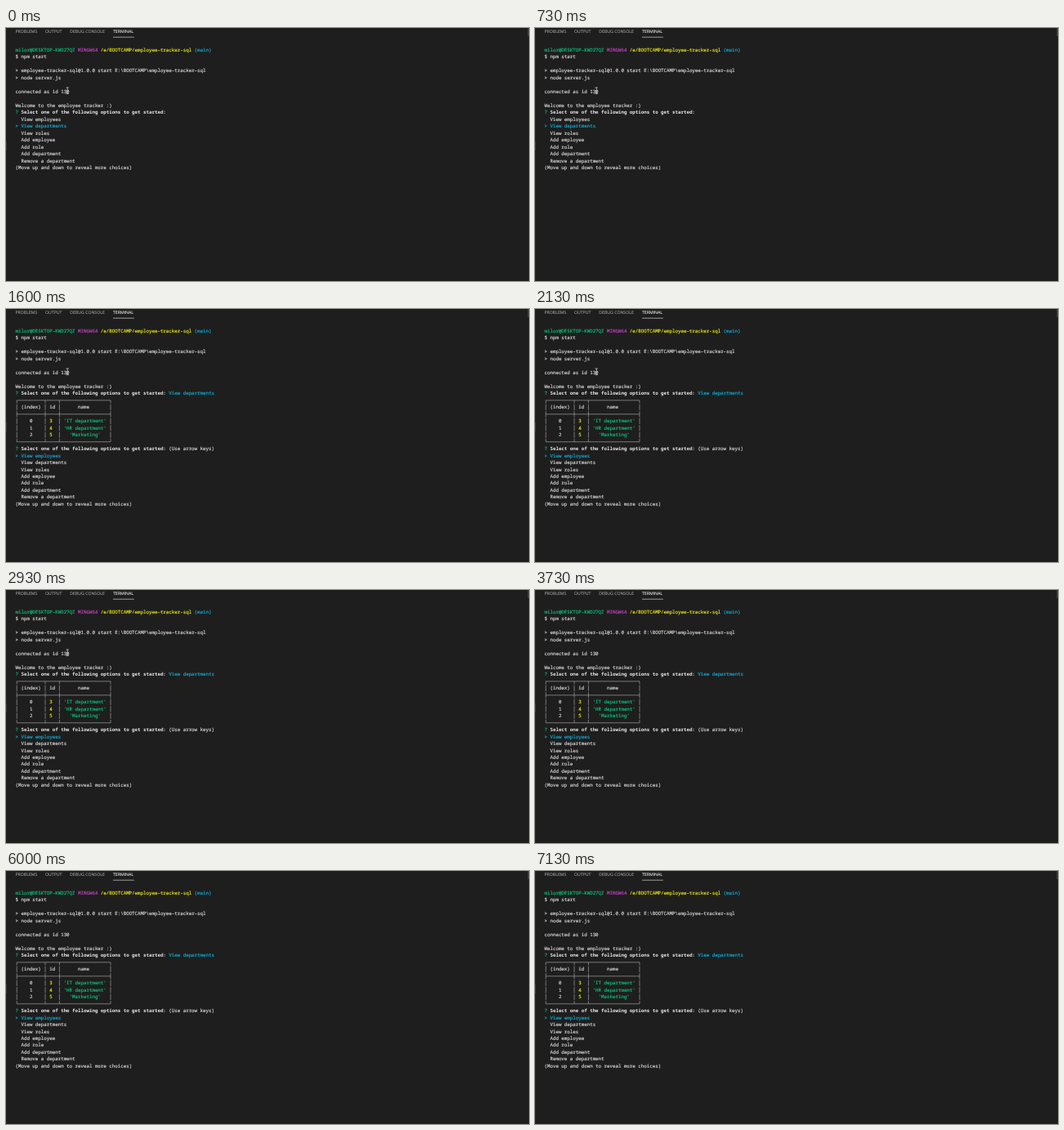
An HTML page that plays this animation: 640x310 px, repeating every 7200 ms.

```html
<!DOCTYPE html>
<html lang="en">
<head>
<meta charset="utf-8">
<title>Employee tracker terminal</title>
<style>
  html, body { margin: 0; width: 100%; height: 100%; overflow: hidden; background: #1e1e1e; }
  svg { display: block; width: 640px; height: 310px; }
  text { font-family: "Noto Sans Mono", "DejaVu Sans Mono", monospace; font-size: 5.8px;
         text-rendering: geometricPrecision; stroke-width: 0.18px; }
  .tab { font-family: "Open Sans", "Noto Sans", sans-serif; font-size: 5.2px; stroke-width: 0.1px; }
</style>
</head>
<body>
<svg id="stage" viewBox="0 0 640 310"></svg>
<script>
const NS = "http://www.w3.org/2000/svg";
const LOOP = 7200, ANSWER_AT = 1600, POINTER_HIDDEN_AT = 3200;
const LEFT = 11.5, BASELINE = 28.9, CELL = 3.478, ROW = 8.48;
const C = { text: "#d0d0d0", bold: "#e8e8e8", green: "#0dbc79", magenta: "#bc3fbc",
            yellow: "#e5e510", cyan: "#11a8cd", rule: "#b4b4b4" };
const CHOICES = ["View employees", "View departments", "View roles", "Add employee",
                 "Add role", "Add department", "Remove a department"];
const stage = document.getElementById("stage");

function add(parent, tag, attrs, content) {
  const node = document.createElementNS(NS, tag);
  for (const key in attrs) node.setAttribute(key, attrs[key]);
  if (content) node.textContent = content;
  return parent.appendChild(node);
}
const group = () => add(stage, "g", {});
const rect = (parent, x, y, width, height, fill) => add(parent, "rect", { x, y, width, height, fill });
const colX = col => LEFT + col * CELL;
const rowY = row => BASELINE + row * ROW;

function write(parent, row, col, content, color = C.text, weight = 400) {
  const stroke = weight > 400 ? "none" : color;
  add(parent, "text", { x: colX(col), y: rowY(row), fill: color, stroke, "font-weight": weight }, content);
}

function question(parent, row) {
  write(parent, row, 0, "?", C.green);
  write(parent, row, 2, "Select one of the following options to get started:", C.bold, 700);
}

function menu(parent, row, selected) {
  CHOICES.forEach((choice, i) => {
    const active = i === selected;
    if (active) write(parent, row + i, 0, ">", C.cyan);
    write(parent, row + i, 2, choice, active ? C.cyan : C.text);
  });
  write(parent, row + CHOICES.length, 0, "(Move up and down to reveal more choices)");
}

function table(parent, top) {
  const mid = row => rowY(row) - 1.8;
  const edges = [0, 10, 15, 33].map(col => colX(col + 0.5));
  const stroke = { stroke: C.rule, "stroke-width": 0.6, fill: "none" };
  for (const row of [top, top + 2, top + 6])
    add(parent, "path", { d: `M${edges[0]} ${mid(row)}H${edges[3]}`, ...stroke });
  for (const x of edges) {
    for (let row = top; row <= top + 6; row++) {
      const start = row === top ? 0 : -3.7;
      const end = row === top + 6 ? 0 : 3.7;
      add(parent, "path", { d: `M${x} ${mid(row) + start}V${mid(row) + end}`, ...stroke });
    }
  }
  write(parent, top + 1, 2, "(index)");
  write(parent, top + 1, 12, "id");
  write(parent, top + 1, 22, "name");
  [["3", 17, "'IT department'"], ["4", 17, "'HR department'"], ["5", 19, "'Marketing'"]]
    .forEach(([id, col, name], i) => {
      write(parent, top + 3 + i, 5, String(i));
      write(parent, top + 3 + i, 12, id, C.yellow);
      write(parent, top + 3 + i, col, name, C.green);
    });
}

function drawShell() {
  const g = group();
  rect(g, 0, 0, 640, 310, "#1e1e1e");
  rect(g, 0, 0, 0.7, 310, "#282828");
  rect(g, 0, 139, 1, 11, "#3c3c3c");
  rect(g, 638.4, 0, 1.6, 10, "#424242");
  [["PROBLEMS", 11.5], ["OUTPUT", 48], ["DEBUG CONSOLE", 78.3], ["TERMINAL", 131]]
    .forEach(([label, x], i) => {
      const color = i === 3 ? "#e7e7e7" : "#9c9c9c";
      add(g, "text", { class: "tab", x, y: 6.1, fill: color, stroke: color }, label);
    });
  rect(g, 131, 10.8, 25.8, 0.7, "#d0d0d0");

  write(g, 0, 0, "milor@DESKTOP-KWD27QZ", C.green);
  write(g, 0, 22, "MINGW64", C.magenta);
  write(g, 0, 30, "/e/BOOTCAMP/employee-tracker-sql", C.yellow);
  write(g, 0, 63, "(main)", C.cyan);
  write(g, 1, 0, "$ npm start");
  write(g, 3, 0, "> employee-tracker-sql@1.0.0 start E:\\BOOTCAMP\\employee-tracker-sql");
  write(g, 4, 0, "> node server.js");
  write(g, 6, 0, "connected as id 130");
  write(g, 8, 0, "Welcome to the employee tracker :)");
  question(g, 9);
}

function drawPointer() {
  const d = "M73.6 73H76.8M75.2 73V80.6M73.6 80.6H76.8";
  return add(stage, "path", { d, fill: "none", stroke: "#c8c8c8", "stroke-width": 0.8 });
}

drawShell();
const choosing = group();
menu(choosing, 10, 1);

const answered = group();
write(answered, 9, 54, "View departments", C.cyan);
table(answered, 10);
question(answered, 17);
write(answered, 17, 54, "(Use arrow keys)");
menu(answered, 18, 0);

const pointer = drawPointer();

const show = (node, visible) => node.setAttribute("visibility", visible ? "visible" : "hidden");

function render(time) {
  show(choosing, time < ANSWER_AT);
  show(answered, time >= ANSWER_AT);
  show(pointer, time < POINTER_HIDDEN_AT);
}

const began = performance.now();
function tick() {
  render((performance.now() - began) % LOOP);
  requestAnimationFrame(tick);
}
render(0);
requestAnimationFrame(tick);
</script>
</body>
</html>
```
